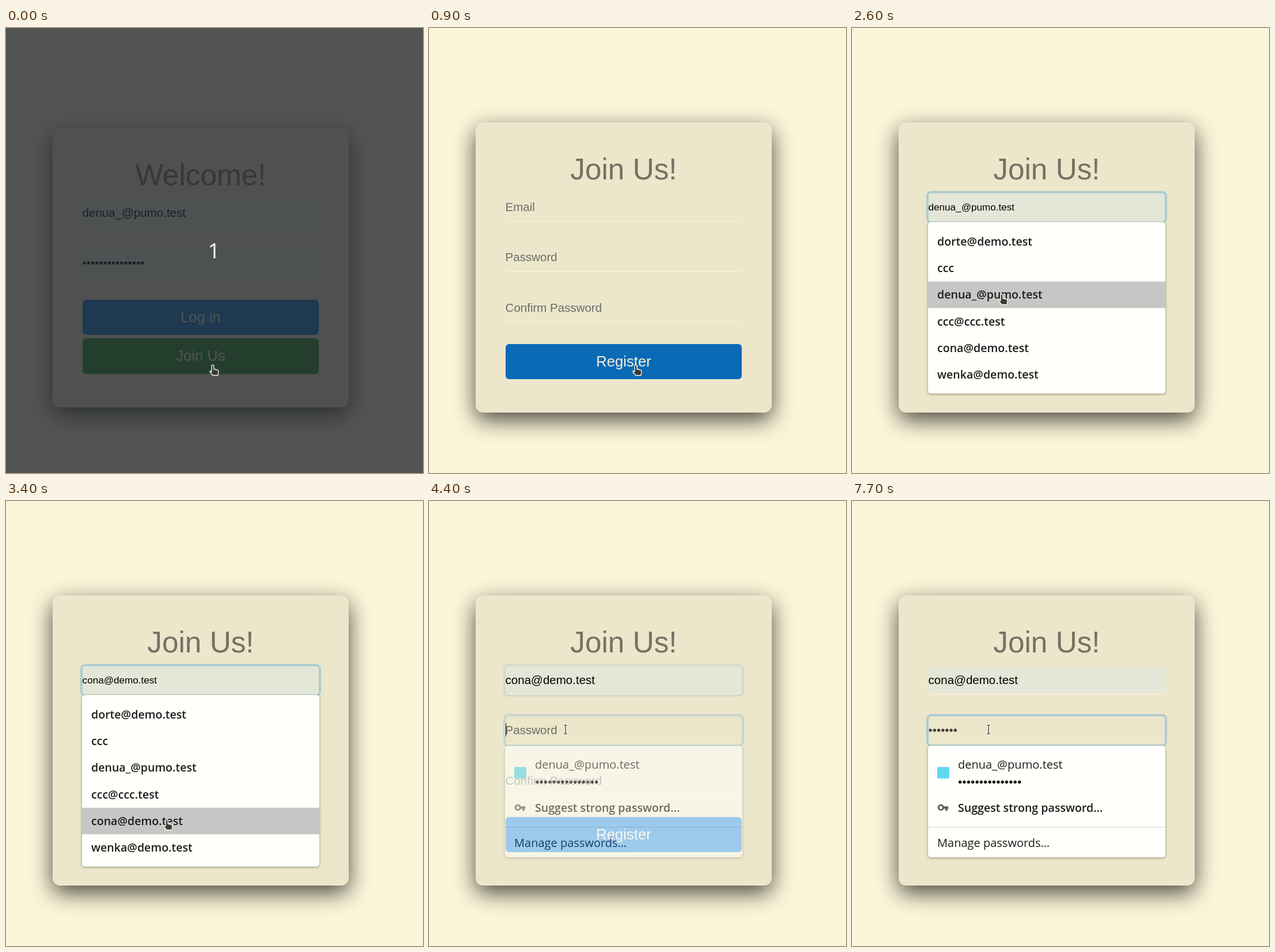
Animation, 724 px wide and 773 px high, one loop 8 s. Source, as an HTML page:

```html
<!DOCTYPE html>
<html lang="en">
<head>
<meta charset="utf-8">
<title>Join form</title>
<style>
* { box-sizing: border-box; }
html, body { margin: 0; width: 100%; height: 100%; overflow: hidden; background: #fbf5d9; }
body { position: relative; font: 20.53px "Liberation Sans", Arial, sans-serif; white-space: nowrap; }

/* One shared clock: 1% = 80 ms, everything moves in hard steps */
body, .t { animation: 8s step-end infinite; }
body { animation-name: row, typed; }
.abs, .card, .card > *, .field > *, .pop, .pop > *, .mouse svg { position: absolute; }

.card {
  left: 81.3px; width: 513.4px; border-radius: 13px; background: #ece6cb;
  box-shadow: 0 12.8px 38.5px rgba(0, 0, 0, .7);
}
.card > * { left: 51.3px; width: 410.7px; }
#login { top: 173.9px; height: 484.9px; animation-name: login; }
#join { top: 163.9px; height: 504.4px; animation-name: join; }

h1 {
  top: 51.3px; margin: 0; font-size: 51.3px; font-weight: 400; line-height: 61.6px;
  text-align: center; color: #777164;
}
.field { height: 48.7px; line-height: 47.4px; }
.field > * { left: 0; top: 0; }
.box { width: 100%; height: 100%; border-radius: 5px; border-bottom: 1.3px solid #fbf5da; }
.filled { background: #e4e7d7; }
.hint { color: #6b6f67; }
.ring { width: 100%; height: 100%; border-radius: 5px; box-shadow: 0 0 0 4.1px #afcccf; }
.field > .caret { top: 12px; width: 1.3px; height: 23px; background: #111; }
.a { top: 123.1px; } .b { top: 210.4px; } .c { top: 297.7px; }

.btn {
  height: 61.6px; line-height: 61.6px; border-radius: 6px; text-align: center;
  font-size: 25.67px; color: #f6f1d8; background: #0a7ad3;
}
.green { background: #27902f; }

#hint1 { animation-name: hint1; }
#fill1 { animation-name: fill1; }
#ring1 { animation-name: ring1; }
#caret1 { animation-name: caret1; }
#caret2 { left: 154.2px; animation-name: caret2; }
#value1 { animation-name: value1; }
#wavy { top: 31px; animation-name: wavy; }
#preview { height: 47.4px; width: 100%; overflow: hidden; font-size: 17.1px; animation-name: preview; }
#preview div { height: 47.4px; line-height: 49px; transform: translateY(calc(var(--row) * -47.4px)); }
#register { animation-name: hover; }
#hint2 { animation-name: hint2; }
#ring2 { animation-name: ring2; }
#dots { overflow: hidden; color: #45443a; width: calc(var(--n) * 7.19px); }
#caret3 { left: calc(var(--n) * 7.19px); animation-name: caret3; }

.pop {
  overflow: hidden; border-radius: 5px; background: #fffffb; color: #1d1d1b;
  font: 20px "Open Sans", "Noto Sans", sans-serif;
}
.shade { filter: drop-shadow(0 1.5px 2px rgba(60, 55, 30, .5)); }
.pop > * { left: 16px; line-height: 46px; }
.pop b, .pop .row { font-size: 19.6px; font-weight: 600; }
#list { left: 132px; top: 337px; width: 411.5px; height: 298px; animation-name: list; }
#list .rows { top: 11px; }
#list .row { height: 46.2px; }
#bar {
  left: 0; top: 11px; width: 100%; height: 46.2px; background: #c5c7c4;
  transform: translateY(calc(var(--row) * 46.2px)); animation-name: bar;
}
#saved { left: 132px; top: 424.5px; width: 411.5px; height: 194px; }
#savedWrap { animation-name: ring2; }
.pop > .logo { top: 37px; width: 20.5px; height: 20.5px; background: #62d8ee; border-radius: 2px; }
.pop > .rule { left: 0; top: 141px; width: 100%; height: 1.3px; background: #d8d9d4; }

#dim { inset: 0; background: rgba(36, 40, 46, .785); animation-name: dim; }
#count {
  left: 311px; top: 361px; width: 100px; line-height: 50px; text-align: center;
  font-size: 37px; font-family: "Open Sans", "Noto Sans", sans-serif; color: #fffff0; animation-name: dim;
}
.mouse { left: 0; top: 0; animation-name: mouse; }
.mouse svg { left: -14px; top: -14px; width: 40px; height: 40px; }
#hand { animation-name: hand; }
#arrow { animation-name: arrow; }
#beam { animation-name: beam; }

@keyframes row { 0% { --row: 0 } 31.25% { --row: 1 } 32.5% { --row: 2 } 33.75% { --row: 3 } 37.5%, 100% { --row: 4 } }
@keyframes typed {
  0% { --n: 0 } 76.25% { --n: 1 } 77.5% { --n: 2 } 80% { --n: 3 } 81.25% { --n: 4 }
  83.75% { --n: 5 } 86.25% { --n: 6 } 93.75%, 100% { --n: 7 }
}
@keyframes dim { 0% { opacity: 1 } 6.25%, 100% { opacity: 0 } }
@keyframes login { 0% { opacity: 1 } 8.75%, 100% { opacity: 0 } }
@keyframes join { 0% { opacity: 0 } 8.75%, 100% { opacity: 1 } }
@keyframes hint1 { 0% { opacity: 1 } 30%, 100% { opacity: 0 } }
@keyframes fill1 { 0% { opacity: 0 } 30%, 100% { opacity: 1 } }
@keyframes ring1 { 0% { opacity: 0 } 23.75% { opacity: .6 } 25% { opacity: 1 } 55% { opacity: .4 } 56.25%, 100% { opacity: 0 } }
@keyframes ring2 { 0% { opacity: 0 } 55% { opacity: .6 } 56.25%, 100% { opacity: 1 } }
@keyframes caret1 { 0% { opacity: 0 } 22.5% { opacity: 1 } 30%, 100% { opacity: 0 } }
@keyframes caret2 { 0% { opacity: 0 } 43.75% { opacity: 1 } 51.25%, 100% { opacity: 0 } }
@keyframes caret3 {
  0% { opacity: 0 } 55% { opacity: 1 } 61.25% { opacity: 0 } 68.75% { opacity: 1 } 96.25%, 100% { opacity: 0 }
}
@keyframes value1 { 0% { opacity: 0 } 43.75%, 100% { opacity: 1 } }
@keyframes wavy { 0% { opacity: 0 } 43.75% { opacity: 1 } 55%, 100% { opacity: 0 } }
@keyframes preview { 0% { opacity: 0 } 30% { opacity: 1 } 43.75%, 100% { opacity: 0 } }
@keyframes bar { 0% { opacity: 0 } 30%, 100% { opacity: 1 } }
@keyframes hint2 { 0% { opacity: 1 } 76.25%, 100% { opacity: 0 } }
@keyframes hover {
  0% { background: #0a6ab6 } 17.5% { background: #0a7ad3 }
  43.75% { background: #0a6ab6 } 46.25%, 100% { background: #0a7ad3 }
}
@keyframes list {
  0% { opacity: 0 } 23.75% { opacity: .5 } 25% { opacity: 1 }
  43.75% { opacity: .45; left: 136px; top: 340px; width: 406px; height: 296px }
  45% { opacity: .07; left: 141px; top: 344px; width: 399px; height: 292px }
  46.25%, 100% { opacity: 0 }
}
@keyframes mouse {
  0% { transform: translate(359px, 585px) }
  15% { transform: translate(358px, 583px) }
  17.5% { transform: translate(335px, 525px) }
  18.75% { transform: translate(275px, 397px) }
  20% { transform: translate(237px, 308px) }
  30% { transform: translate(242px, 355px) }
  31.25% { transform: translate(251px, 410px) }
  32.5% { transform: translate(260px, 462px) }
  33.75% { transform: translate(268px, 512px) }
  36.25% { transform: translate(272px, 526px) }
  37.5% { transform: translate(276px, 541px) }
  38.75% { transform: translate(278px, 550px) }
  42.5% { transform: translate(279px, 553px) }
  45% { transform: translate(263px, 464px) }
  46.25% { transform: translate(253px, 435px) }
  48.75% { transform: translate(247px, 420px) }
  50% { transform: translate(240px, 402px) }
  51.25%, 100% { transform: translate(237px, 397px) }
}
@keyframes hand { 0% { opacity: 1 } 17.5% { opacity: 0 } 30% { opacity: 1 } 45%, 100% { opacity: 0 } }
@keyframes arrow { 0% { opacity: 0 } 17.5% { opacity: 1 } 18.75% { opacity: 0 } 45% { opacity: 1 } 50%, 100% { opacity: 0 } }
@keyframes beam { 0% { opacity: 0 } 18.75% { opacity: 1 } 30% { opacity: 0 } 50%, 100% { opacity: 1 } }
</style>
</head>
<body>
<div class="card t" id="login">
  <h1>Welcome!</h1>
  <div class="field a"><div class="box filled"></div><span>denua_@pumo.test</span></div>
  <div class="field b"><div class="box filled"></div><span>•••••••••••••••</span></div>
  <div class="btn c">Log in</div>
  <div class="btn green" style="top:365.6px">Join Us</div>
</div>

<div class="card t" id="join">
  <h1>Join Us!</h1>
  <div class="field a">
    <div class="ring t" id="ring1" style="background:#ece6cb"></div>
    <div class="box"></div>
    <div class="box filled t" id="fill1"></div>
    <span class="hint t" id="hint1">Email</span>
    <div class="t" id="preview">
      <div>dorte@demo.test</div><div>ccc</div><div>denua_@pumo.test</div>
      <div>ccc@ccc.test</div><div>cona@demo.test</div>
    </div>
    <span class="t" id="value1">cona@demo.test</span>
    <svg class="t" id="wavy" width="40" height="4">
      <pattern id="zig" width="4" height="4" patternUnits="userSpaceOnUse">
        <path d="M-1 2L0 3L2 1L4 3L5 2" fill="none" stroke="#e02a1c" stroke-width="1.2"/>
      </pattern>
      <rect width="40" height="4" fill="url(#zig)"/>
    </svg>
    <div class="caret t" id="caret1"></div>
    <div class="caret t" id="caret2"></div>
  </div>
  <div class="field b">
    <div class="ring t" id="ring2"></div>
    <div class="box"></div>
    <span class="hint t" id="hint2">Password</span>
    <span id="dots">•••••••</span>
    <div class="caret t" id="caret3"></div>
  </div>
  <div class="field c"><div class="box"></div><span class="hint">Confirm Password</span></div>
  <div class="btn t" id="register" style="top:385px">Register</div>
</div>

<div class="shade">
  <div class="pop t" id="list">
    <div class="t" id="bar"></div>
    <div class="rows">
      <div class="row">dorte@demo.test</div>
      <div class="row">ccc</div>
      <div class="row">denua_@pumo.test</div>
      <div class="row">ccc@ccc.test</div>
      <div class="row">cona@demo.test</div>
      <div class="row">wenka@demo.test</div>
    </div>
  </div>
</div>

<div class="shade t" id="savedWrap">
  <div class="pop" id="saved">
    <div class="logo"></div>
    <span style="left:52px;top:10px">denua_@pumo.test</span>
    <span style="left:52px;top:40.5px;font:21px/46px 'Liberation Sans',Arial,sans-serif">•••••••••••••••</span>
    <svg style="top:100px" width="21" height="16">
      <circle cx="6.3" cy="7.4" r="4.1" fill="none" stroke="#5c5e5c" stroke-width="3"/>
      <path d="M10 5.4h9.3v4h-1.5v3.6h-3.6v-3.6h-4.2z" fill="#5c5e5c"/>
    </svg>
    <b style="left:52px;top:85.5px">Suggest strong password…</b>
    <div class="rule"></div>
    <span style="top:146px">Manage passwords…</span>
  </div>
</div>

<div class="abs t" id="dim"></div>
<div class="abs t" id="count">1</div>

<div class="abs t mouse">
  <svg class="t" id="hand" viewBox="-14 -14 40 40">
    <path d="M-2 2Q-2 .3 0 .3T2 2V7.5L8 9Q10.4 9.8 10 12L9 18.5H0L-5 12.5Q-5.6 10.6-3.6 10.6L-2 12Z"
      fill="#3a3a38" stroke="#fffff2" stroke-width="1.3" stroke-linejoin="round"/>
  </svg>
  <svg class="t" id="arrow" viewBox="-14 -14 40 40">
    <path d="M0 0V17.5L4 13.8L6.6 20L9.4 18.8L6.8 12.8H12Z" fill="#1c1c22" stroke="#f6f2e0" stroke-width="1"/>
  </svg>
  <svg class="t" id="beam" viewBox="-14 -14 40 40">
    <g fill="none" stroke-linecap="square">
      <path id="i" d="M-2.5-7.5H2.5M0-7.5V7.5M-2.5 7.5H2.5" stroke="#fffff2" stroke-width="3"/>
      <path d="M-2.5-7.5H2.5M0-7.5V7.5M-2.5 7.5H2.5" stroke="#222" stroke-width="1.2"/>
    </g>
  </svg>
</div>
</body>
</html>
```
